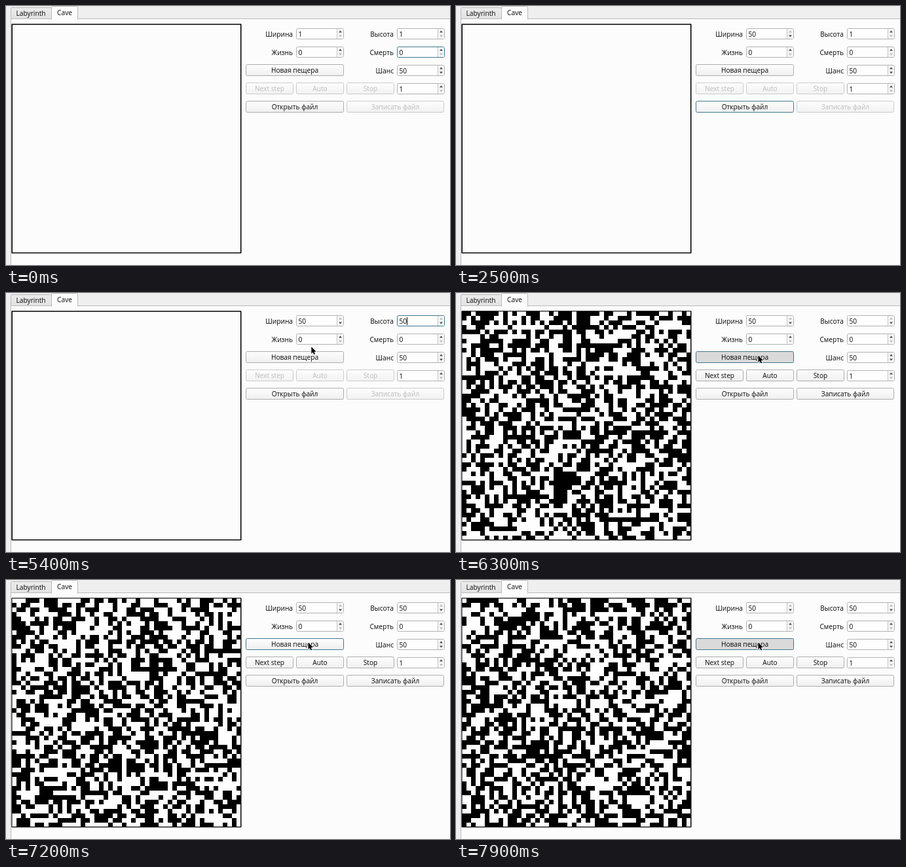
Animation, 678 px wide and 396 px high, one loop 8 s. Source, as an HTML page with a canvas:

```html
<!DOCTYPE html>
<html lang="ru">
<head>
<meta charset="utf-8">
<title>Cave</title>
<style>
html, body { margin: 0; width: 100%; height: 100%; overflow: hidden; background: #fcfcfc; }
canvas { display: block; }
</style>
</head>
<body>
<canvas id="stage" width="678" height="396"></canvas>
<script>
const ctx = document.getElementById('stage').getContext('2d');
const LOOP = 8000, STEP = 100;
const BLUE = '#41788f', HIGHLIGHT = '#308cc6', INK = '#080808';
const CAVE = { x: 9, y: 28, size: 349.5, cells: 50 };
const rowY = row => 34 + row * 28;

function label(text, x, y, align = 'left', color = INK) {
  ctx.font = '500 10.2px "Open Sans", "Noto Sans", sans-serif';
  ctx.textAlign = align;
  ctx.fillStyle = color;
  ctx.fillText(text, x, y);
}

function box(x, y, w, h, fill, stroke) {
  ctx.beginPath();
  ctx.roundRect(x + .5, y + .5, w - 1, h - 1, 2);
  ctx.fillStyle = fill;
  ctx.fill();
  ctx.strokeStyle = stroke;
  ctx.lineWidth = 1;
  ctx.stroke();
}

function shade(y, h, top, bottom) {
  const g = ctx.createLinearGradient(0, y, 0, y + h);
  g.addColorStop(0, top);
  g.addColorStop(1, bottom);
  return g;
}

function triangle(x, y, dir, on) {
  ctx.beginPath();
  ctx.moveTo(x - 2.5, y + dir * 1.5);
  ctx.lineTo(x + 2.5, y + dir * 1.5);
  ctx.lineTo(x, y - dir * 1.5);
  ctx.fillStyle = on ? '#484848' : '#b4b4b4';
  ctx.fill();
}

function button(text, x, row, w, { enabled = true, focus, pressed } = {}) {
  const y = rowY(row) - 1;
  const fill = pressed ? '#dadada' : shade(y, 18, '#fefefe', enabled ? '#efefef' : '#f1f1f1');
  box(x, y, w, 18, fill, focus ? BLUE : enabled ? '#acacac' : '#cbcbcb');
  label(text, x + w / 2, y + 13, 'center', enabled ? INK : '#bcbcbc');
}

function spin(x, row, value, { up = true, down = true, focus, selected, caret } = {}) {
  const y = rowY(row);
  box(x, y, 73, 17, '#fefefe', focus ? BLUE : '#b2b2b2');
  ctx.fillStyle = '#f6f6f6';
  ctx.fillRect(x + 63, y + 1, 9, 15);
  ctx.fillStyle = '#c4c4c4';
  ctx.fillRect(x + 62, y + 1, 1, 15);
  triangle(x + 67.5, y + 5, 1, up);
  triangle(x + 67.5, y + 12, -1, down);
  if (selected) {
    ctx.fillStyle = HIGHLIGHT;
    ctx.fillRect(x + 3, y + 3, 7, 12);
  }
  label(value, x + 3.5, y + 12.5, 'left', selected ? '#fff' : INK);
  if (caret) {
    ctx.fillStyle = INK;
    ctx.fillRect(Math.round(x + 3.5 + ctx.measureText(value).width), y + 3, 1, 12);
  }
}

function frame() {
  ctx.fillStyle = '#fcfcfc';
  ctx.fillRect(0, 0, 678, 396);
  ctx.fillStyle = '#efefef';
  ctx.fillRect(0, 0, 678, 19);
  ctx.fillRect(0, 0, 7, 396);
  ctx.fillStyle = '#b9b9b9';
  ctx.fillRect(7, 19, 671, 1);
  ctx.fillRect(7, 19, 1, 377);
  box(7, 2, 63, 18, shade(2, 18, '#ececec', '#e2e2e2'), '#b9b9b9');
  box(69, 0, 41, 22, '#fcfcfc', '#b9b9b9');
  ctx.fillStyle = '#fcfcfc';
  ctx.fillRect(70, 19, 39, 4);
  label('Labyrinth', 38, 15, 'center');
  label('Cave', 89.5, 14, 'center');
  ctx.strokeStyle = '#000';
  ctx.lineWidth = 1.6;
  ctx.lineJoin = 'round';
  ctx.strokeRect(CAVE.x + .2, CAVE.y, CAVE.size, CAVE.size);
}

function cave(seed) {
  const { x, y, size, cells } = CAVE;
  const edge = i => Math.round(i * size / cells);
  ctx.fillStyle = '#fefefe';
  ctx.fillRect(x + .5, y + .5, size - 1, size - 1);
  ctx.fillStyle = '#000';
  let s = seed * 7919 + 17;
  for (let row = 0; row < cells; row++) {
    for (let col = 0; col < cells; col++) {
      s = (s * 1664525 + 1013904223) % 4294967296;
      if (s >= 2147483648) continue;
      const left = edge(col), top = edge(row);
      ctx.fillRect(x + left, y + top, edge(col + 1) - left, edge(row + 1) - top);
    }
  }
}

function arrow(x, y) {
  const points = [[0, 0], [0, 10.5], [2.4, 8.4], [4, 12], [5.7, 11.2], [4.2, 7.7], [7.4, 7.5]];
  ctx.beginPath();
  points.forEach(([dx, dy]) => ctx.lineTo(x + dx, y + dy));
  ctx.closePath();
  ctx.strokeStyle = '#fff';
  ctx.lineWidth = 1.4;
  ctx.stroke();
  ctx.fillStyle = '#000';
  ctx.fill();
}

function beam(x, y) {
  x = Math.round(x);
  y = Math.round(y);
  ctx.fillStyle = '#222';
  ctx.fillRect(x, y - 5, 1, 11);
  ctx.fillRect(x - 2, y - 6, 5, 1);
  ctx.fillRect(x - 2, y + 6, 5, 1);
}

// Eased quadratic path between two moments
function glide(t, start, end, a, b, c) {
  const p = Math.min(1, Math.max(0, (t - start) / (end - start)));
  const k = p * p * (3 - 2 * p);
  return a.map((v, i) => v * (1 - k) ** 2 + 2 * b[i] * k * (1 - k) + c[i] * k * k);
}

function pointer(t) {
  if (t < 100 || t >= 1500 && t < 3300) return;
  if (t < 1000) {
    const [x, y] = glide(t, 100, 900, [660, 81], [590, 12], [452, 42]);
    const overField = y > 34 && y < 51 && (x > 443 && x < 505 || x > 597 && x < 659);
    (overField ? beam : arrow)(x, y);
  } else if (t < 1500) {
    beam(452 - (t - 1000) * .04, 42);
  } else if (t < 4900) {
    arrow(...glide(t, 3200, 3800, [428, 42], [500, 50], [549, 24]));
  } else {
    arrow(...glide(t, 4800, 5500, [549, 24], [505, -30], [461.5, 95.5]));
  }
}

function focusAt(t) {
  if (t < 1000) return 'death';
  if (t < 2400) return 'width';
  if (t < 2500) return 'new';
  if (t < 3100) return 'open';
  return t < 5600 ? 'height' : 'new';
}

function draw(t) {
  const focus = focusAt(t);
  const made = t >= 5700;
  const pressed = t === 5600 || t >= 6100 && t / STEP % 2 === 1;
  const width = t < 1500 ? '1' : t < 2000 ? '' : t < 2100 ? '5' : '50';
  const height = t < 4100 ? '1' : t < 4300 ? '5' : '50';

  frame();
  // A new cave appears whenever the button is released
  if (made) cave(t < 6200 ? 0 : Math.floor((t - 6000) / 200));

  label('Ширина', 438, 46.5, 'right');
  label('Высота', 592, 46.5, 'right');
  label('Жизнь', 438, 74.5, 'right');
  label('Смерть', 592, 74.5, 'right');
  label('Шанс', 592, 102.5, 'right');

  spin(443, 0, width, {
    up: width !== '50', down: width > '1', focus: focus === 'width',
    selected: t >= 1200 && t < 1500,
    caret: focus === 'width' && (t < 1200 || t >= 1500 && t < 1800 || t >= 2000)
  });
  spin(597, 0, height, {
    up: height !== '50', down: height !== '1', focus: focus === 'height',
    selected: focus === 'height' && t < 4100,
    caret: focus === 'height' && t >= 4100
  });
  spin(443, 1, '0', { down: false });
  spin(597, 1, '0', { down: false, focus: focus === 'death' });
  spin(597, 2, '50');
  spin(597, 3, '1', { down: false });

  button('Новая пещера', 366, 2, 150, { focus: focus === 'new', pressed });
  button('Next step', 366, 3, 73, { enabled: made });
  button('Auto', 443, 3, 73, { enabled: made });
  button('Stop', 520, 3, 73, { enabled: made });
  button('Открыть файл', 366, 4, 150, { focus: focus === 'open' });
  button('Записать файл', 520, 4, 149, { enabled: made });
  pointer(t);
}

const began = performance.now();
function tick() {
  const t = (performance.now() - began) % LOOP;
  draw(Math.floor(t / STEP) * STEP);
  requestAnimationFrame(tick);
}
tick();
</script>
</body>
</html>
```
